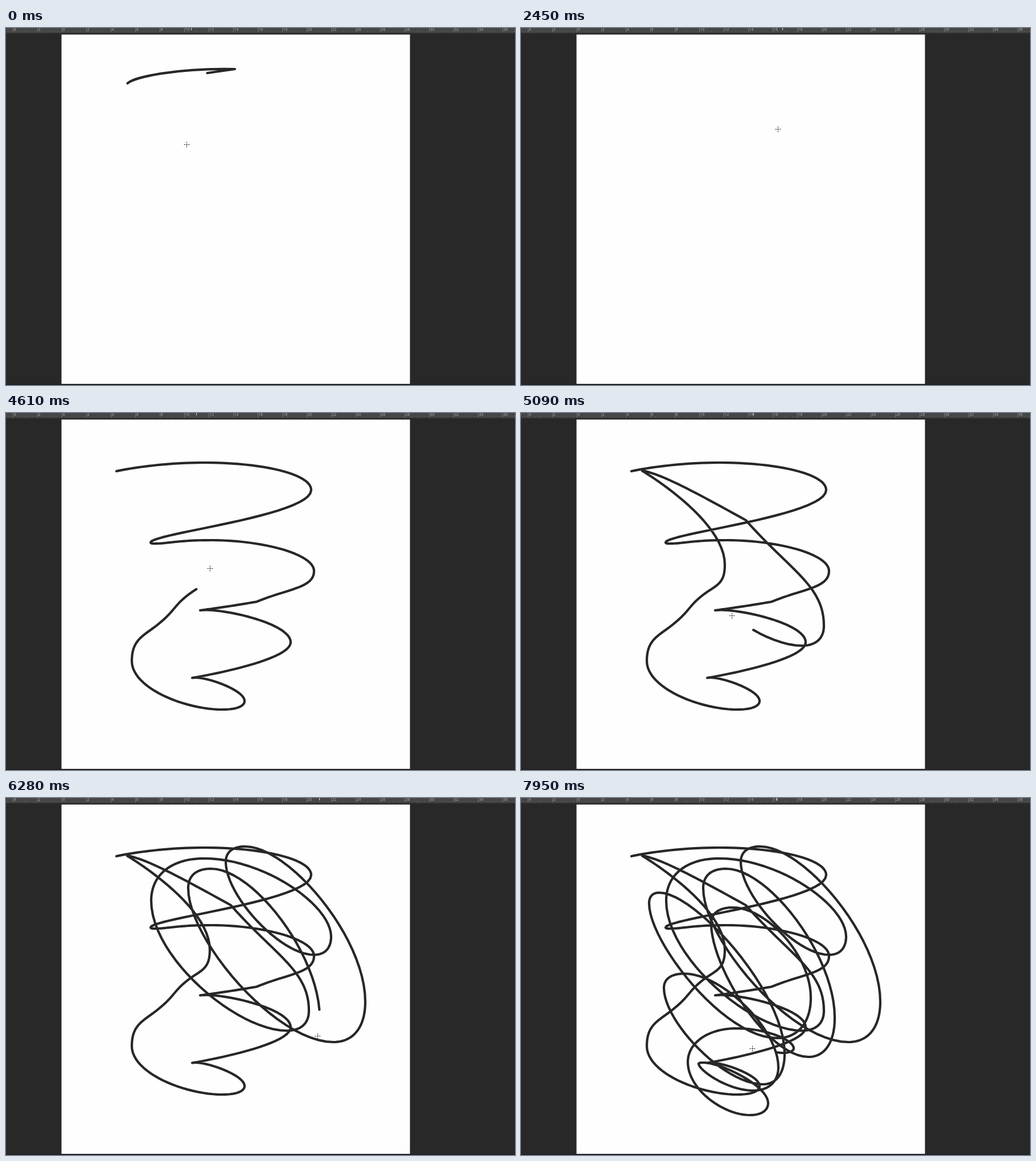
Animation, 894 px wide and 626 px high, one loop 8000 ms. Source, as an HTML page:

```html
<!DOCTYPE html>
<html lang="en">
<head>
<meta charset="utf-8">
<title>Scribble</title>
<style>
  html, body { margin: 0; width: 100%; height: 100%; overflow: hidden; background: #282828; }
  svg { display: block; }
  .ink { fill: none; stroke: #282627; stroke-width: 4.2; stroke-linecap: round; stroke-linejoin: round; }
  text { font: 6.5px "Open Sans", "Noto Sans", sans-serif; fill: #b0b0b0; }
</style>
</head>
<body>
<svg width="894" height="626" viewBox="0 0 894 626">
  <rect width="894" height="626" fill="#282828"/>
  <rect width="894" height="8" fill="#464646"/>
  <rect y="8" width="894" height="2" fill="#323232"/>
  <g id="ruler"></g>
  <rect y="624" width="894" height="2" fill="#222"/>
  <rect x="97.5" y="11.5" width="612" height="612.5" fill="#fefefe"/>
  <path id="sketch" class="ink" d="M213.5 97C225 86 300 70 402 72L353.5 79"/>
  <polyline id="trace" class="ink"/>
  <path id="marker" d="M.5 0V4" stroke="#ddd"/>
  <g id="cursor">
    <path d="M-5 0H-2.5M2.5 0H5M0 -5V-2.5M0 2.5V5" stroke="#333"/>
    <rect x="-1" y="-1" width="2" height="2" fill="#111"/>
  </g>
</svg>
<script>
const LOOP = 8000, STEP = 120, SAMPLES = 24, LEAD = 46;
const $ = id => document.getElementById(id);
const trace = $("trace");

// Turning points of the pen
const turns = [
  [194, 102], [348, 87], [536, 135], [254, 227], [260, 229], [360, 223], [541, 277], [440, 331],
  [341, 346], [352, 345.5], [500, 402], [327, 464.5], [333, 464], [419, 505], [380, 520], [221, 435],
  [296, 342], [358, 266], [213, 101.5], [218, 102], [395, 188], [532, 373], [493, 408], [255, 180],
  [348, 106], [571, 243], [541, 275], [386, 112], [420, 85], [631, 357], [575, 428], [320, 158],
  [360, 124], [551, 385], [505, 454], [334, 220], [372, 192], [509, 350], [450, 421], [225, 185],
  [243, 166], [463, 448], [425, 502], [251, 333], [287, 308], [452, 472], [408, 513], [312, 466],
  [320, 464], [434, 535], [402, 556], [293, 463], [378, 404], [479, 439], [460, 447], [449, 446],
  [406, 439]];

// Time and the turn (with fraction) the pen has reached by then
const pace = [[2890, 0], [3770, 6.25], [4610, 16.42], [5690, 28.25], [6870, 40.06], [7950, 55]];

const lerp = (a, b, u) => a + (b - a) * u;

// Bezier handle at p towards "to": each axis swings like a cosine and rests where it turns back
function pull(p, from, to, axis) {
  if (!from) return p[axis];
  const span = to[axis] - from[axis], f = (to[axis] - p[axis]) / span;
  if (!(f > 0 && f < 1)) return p[axis];
  const angle = Math.acos(1 - 2 * f);
  return p[axis] + 4 / 3 * Math.tan(angle / 4) * Math.sqrt(f * (1 - f)) * span;
}

function pointAt(i, u) {
  const [before, a, b, after] = [-1, 0, 1, 2].map(n => turns[i + n]);
  const v = 1 - u;
  return [0, 1].map(k => v ** 3 * a[k] + 3 * v * v * u * pull(a, before, b, k)
    + 3 * v * u * u * pull(b, after, a, k) + u ** 3 * b[k]);
}

const points = [turns[0]], lengths = [0];
for (let i = 0; i < turns.length - 1; i++) {
  for (let s = 1; s <= SAMPLES; s++) {
    const p = pointAt(i, s / SAMPLES), last = points[points.length - 1];
    lengths.push(lengths[lengths.length - 1] + Math.hypot(p[0] - last[0], p[1] - last[1]));
    points.push(p);
  }
}
trace.setAttribute("points", points.join(" "));
const marks = pace.map(([t, turn]) => [t, lengths[Math.round(turn * SAMPLES)]]);

function drawn(t) {
  if (t <= marks[0][0]) return 0;
  const i = marks.findIndex(m => m[0] >= t);
  if (i < 0) return marks[marks.length - 1][1];
  const [t0, s0] = marks[i - 1], [t1, s1] = marks[i];
  return lerp(s0, s1, (t - t0) / (t1 - t0));
}

// Cursor while the pen is up
function hover(t) {
  const glide = (a, b, u) => ({ x: lerp(a[0], b[0], Math.min(u, 1)), y: lerp(a[1], b[1], Math.min(u, 1)) });
  if (t < 1110) return glide([317, 204], [283, 111], t / 240);
  if (t < 2450) return { x: 293, y: 122 };
  return glide([451, 177], turns[0], (t - 2450) / 410);
}

// The picture advances in steps, realigned at a few times
function snap(t) {
  const base = [6870, 5800, 2450, 1350, 1110, 0].find(b => t >= b);
  return base + Math.floor((t - base) / STEP) * STEP;
}

function drawRuler() {
  let ticks = "", labels = "";
  for (let n = -6; n <= 38; n += 2) {
    const x = 98 + n * 21.5;
    for (let k = 1; k < 10; k++) ticks += `M${x + k * 4.3} ${k === 5 ? 5 : 6.5}V8`;
    labels += `<path d="M${Math.round(x) + 0.5} 0V8" stroke="#777"/><text x="${x + 1.8}" y="5.2">${Math.abs(n)}</text>`;
  }
  $("ruler").innerHTML = `<path d="${ticks}" stroke="#666" stroke-width=".8"/>${labels}`;
}

function move(id, x, y) {
  $(id).setAttribute("transform", `translate(${x} ${y})`);
}

const start = performance.now();
function frame() {
  const t = snap((performance.now() - start) % LOOP);
  const length = drawn(t);
  $("sketch").style.display = t < 1350 ? "" : "none";
  trace.style.display = length ? "" : "none";
  trace.style.strokeDasharray = `${length} 99999`;
  const cursor = length ? trace.getPointAtLength(length + LEAD) : hover(t);
  const markerX = length ? trace.getPointAtLength(length).x : cursor.x + 8;
  move("cursor", Math.round(cursor.x) + 0.5, Math.round(cursor.y) + 0.5);
  move("marker", Math.round(markerX), 0);
  requestAnimationFrame(frame);
}

drawRuler();
frame();
</script>
</body>
</html>
```
